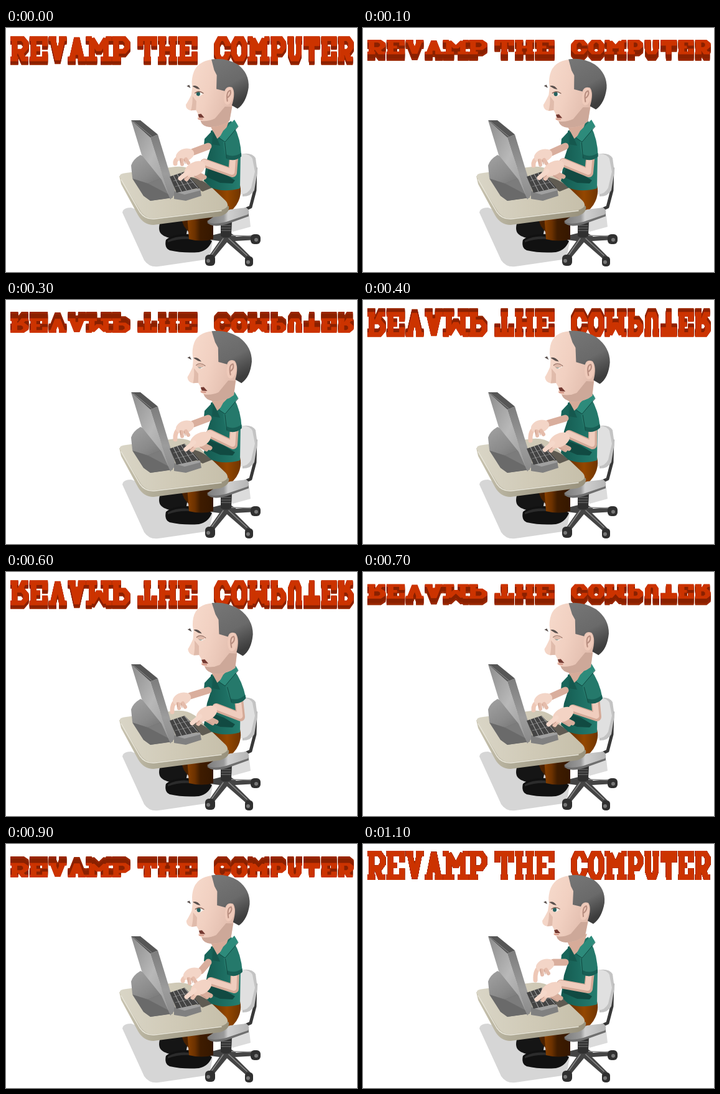
An HTML page that plays this animation: 564 by 394 pixels, repeating every 1200 ms.

```html
<!DOCTYPE html>
<html lang="en">
<head>
<meta charset="utf-8">
<title>Revamp the computer</title>
<style>
  html, body { margin: 0; width: 100%; height: 100%; overflow: hidden; background: #fff; }
  svg { display: block; width: 564px; height: 394px; }
  .line { fill: none; stroke-linecap: round; stroke-linejoin: round; }
  #title path { fill: none; stroke-width: 9; stroke-miterlimit: 2; }
</style>
</head>
<body>
<svg viewBox="0 0 564 394" role="img" aria-label="REVAMP THE COMPUTER">
  <defs>
    <linearGradient id="panel" x2="1" y2="1"><stop stop-color="#8c8c8c"/><stop offset=".5" stop-color="#b8b8b8"/><stop offset="1" stop-color="#999"/></linearGradient>
    <linearGradient id="side" x2="0" y2="1"><stop stop-color="#7d7d7d"/><stop offset=".6" stop-color="#9c9c9c"/><stop offset="1" stop-color="#8a8a8a"/></linearGradient>
    <linearGradient id="bulge" x2=".6" y2="1"><stop stop-color="#a2a2a2"/><stop offset=".5" stop-color="#8a8a8a"/><stop offset="1" stop-color="#666"/></linearGradient>
    <linearGradient id="desk" x2="1"><stop stop-color="#d9d5c6"/><stop offset=".5" stop-color="#d0cab7"/><stop offset="1" stop-color="#c6bfaa"/></linearGradient>
    <linearGradient id="rim" x2="1"><stop stop-color="#c9c4b1"/><stop offset=".3" stop-color="#b2ad99"/><stop offset="1" stop-color="#98917c"/></linearGradient>
    <linearGradient id="seat" x2="1"><stop stop-color="#7c7c7c"/><stop offset=".4" stop-color="#9a9a9a"/><stop offset=".5" stop-color="#cfcfcf"/><stop offset="1" stop-color="#b5b5b5"/></linearGradient>
    <linearGradient id="leg" x2="1"><stop stop-color="#8a4100"/><stop offset=".3" stop-color="#6b3100"/><stop offset=".5" stop-color="#3f1c00"/><stop offset="1" stop-color="#351700"/></linearGradient>
    <linearGradient id="hip" x2="1"><stop stop-color="#5a2900"/><stop offset=".6" stop-color="#944700"/><stop offset="1" stop-color="#6f3400"/></linearGradient>
    <linearGradient id="face" x2="1" y2=".4"><stop stop-color="#f8ddcf"/><stop offset=".5" stop-color="#f1d0c1"/><stop offset="1" stop-color="#ddb7a8"/></linearGradient>
    <linearGradient id="hair" x2=".4" y2="1"><stop stop-color="#777"/><stop offset=".6" stop-color="#6a6a6a"/><stop offset="1" stop-color="#3d3d3d"/></linearGradient>
    <linearGradient id="shirt" x2="1"><stop stop-color="#14594f"/><stop offset=".5" stop-color="#1c6c60"/><stop offset="1" stop-color="#257e70"/></linearGradient>
  </defs>

  <g id="title"></g>

  <!-- floor shadows -->
  <path fill="#d6d6d6" d="M187 298Q188 290 201 290L260 312 332 345 327 373 245 385Q230 387 222 375Z"/>
  <path fill="#dcdcdc" d="M370 303L391 303 393 321 364 329 358 316Z"/>

  <!-- chair -->
  <path class="line" stroke="#383838" stroke-width="5" d="M401 226L400 262 393 289 382 294"/>
  <path fill="#c3c3c3" d="M377 204Q394 200 401 210L404 232 399 262Q394 272 380 272Z"/>
  <path fill="#e0e0e0" d="M374 204Q390 201 396 211L400 232 394 258Q388 270 374 268Z"/>
  <path fill="#444" d="M346 331H361L370 337 402 334V342L368 344 393 369 387 374 355 346 332 374 325 370 343 344 328 342 330 335Z"/>
  <path class="line" stroke="#8a8a8a" stroke-width="1.5" d="M349 340L330 367M358 340L387 367M362 335L396 336"/>
  <path fill="#303030" d="M345 312H363L362 336Q353 341 345 336Z"/>
  <path class="line" stroke="#777" d="M346 319H361M346 323H361M346 327H361"/>
  <g fill="#303030">
    <rect x="320" y="366" width="16" height="18" rx="6"/><rect x="384" y="369" width="13" height="16" rx="5"/><rect x="393" y="333" width="16" height="16" rx="6"/>
  </g>
  <g fill="#777"><circle cx="325" cy="376" r="3"/><circle cx="389" cy="378" r="3"/><circle cx="402" cy="342" r="3"/></g>

  <!-- legs -->
  <path fill="#151515" d="M247 316Q244 328 250 333 260 342 288 342L294 312Q266 310 247 316Z"/>
  <path fill="#4a2100" d="M280 305H300V338L286 320Z"/>
  <path fill="#111" d="M257 342Q254 355 263 359 285 364 310 362 325 359 331 344L318 335Q272 328 257 342Z"/>
  <path fill="#2c2c2c" d="M260 343Q275 335 293 337L296 341Q276 340 260 346Z"/>
  <path fill="url(#leg)" d="M291 302H333V341Q315 346 294 341Z"/>
  <path fill="url(#hip)" d="M322 252L376 254Q380 270 370 286L357 302 345 300Z"/>
  <path fill="#6f6f6f" d="M323 314L355 304 390 296 390 304 354 317Q330 323 323 314Z"/>
  <path fill="url(#seat)" d="M323 312Q334 303 360 293L386 290Q393 295 389 301L354 313Q330 319 323 312Z"/>

  <!-- desk -->
  <path fill="url(#rim)" d="M182 239L185 252 212 302Q221 318 237 318L344 304Q360 299 358 288L340 275Z"/>
  <path fill="url(#desk)" d="M183 241Q181 235 193 234L272 224Q290 222 304 232L353 279Q362 289 346 294L240 307Q226 309 217 297L187 248Z"/>
  <path class="line" stroke="#e9e6da" stroke-width="1.5" d="M185 245L215 297Q224 310 240 308L346 295"/>
  <path fill="#5f5b52" d="M286 240Q312 240 331 258L316 264 300 256Z"/>

  <!-- monitor -->
  <path fill="url(#bulge)" d="M201 222Q204 212 216 205L228 210 254 238 268 274 232 279 221 271 203 242Z"/>
  <path fill="#6a6a6a" d="M203 243L228 251 256 240 266 274 232 279 221 271Z"/>
  <path fill="#7c7c7c" d="M228 251L256 240 264 270Z"/>
  <path fill="url(#panel)" d="M201 149L232 177 264 276 250 245 218 205Z"/>
  <path fill="url(#side)" d="M232 177L244 172 273 267 264 277Z"/>
  <path fill="#565656" d="M201 149L216 149 244 172 232 177Z"/>
  <path class="line" stroke="#8f8f8f" d="M205 151L234 175"/>

  <!-- keyboard -->
  <path fill="#808080" d="M270 264L312 260 314 271 289 279 270 276Z"/>
  <path fill="#a0a0a0" d="M273 265L311 259 313 262 287 269Z"/>
  <path fill="#444" d="M263 240L287 232 311 258 274 266Z"/>
  <path class="line" stroke="#777" d="M269 247L294 240M272 256L301 249"/>
  <path class="line" stroke="#b4b4b4" d="M269 238L282 264M275 236L290 262M281 234L299 261M287 233L308 258"/>

  <!-- man -->
  <path fill="#19655a" d="M334 163L319 179 318 189 329 195 338 182Z"/>
  <path fill="url(#shirt)" d="M345 160L329 166 331 187 323 212 318 247 330 258Q350 266 376 259L377 200 370 170 362 150Z"/>
  <path fill="#114a42" d="M326 226L350 235 368 246 364 251 344 250 321 240Z"/>
  <path fill="#d6ab99" d="M327 155L360 145 352 168 338 180 333 168Z"/>
  <path fill="#15584e" d="M333 167L339 178 344 190 331 188Z"/>
  <path id="farArm" class="line" stroke="#d9ae9d" stroke-width="11"/>
  <g id="farHand">
    <path id="farFinger" class="line" stroke="#eec8b7" stroke-width="7"/>
    <ellipse cx="3" cy="-1" rx="15" ry="10" transform="rotate(-18)" fill="#f3d5c7"/>
    <path class="line" stroke="#e5bcab" stroke-width="6" d="M4 5L8 11M-3 6L-2 13"/>
    <path class="line" stroke="#c99d8b" d="M-5 4L-4 11M1 5L3 12"/>
  </g>
  <path id="nearArm" class="line" stroke="#d4a997" stroke-width="14"/>
  <path id="nearLight" class="line" stroke="#f0cdbe" stroke-width="9" transform="translate(-1 -1.5)"/>
  <g id="sleeve">
    <path fill="#25796b" d="M349 178L366 158Q377 180 377 207 366 216 353 211 347 194 349 178Z"/>
    <path fill="#185f55" d="M353 204Q365 210 377 202V208Q366 217 353 211Z"/>
    <path class="line" stroke="#114a42" d="M351 185L353 210"/>
  </g>
  <path fill="#2d8b7b" d="M343 177L349 166 367 148 373 158 352 184Z"/>
  <path class="line" stroke="#114a42" d="M343 178L352 184 373 159"/>
  <g id="nearHand">
    <path class="line" stroke="#d8ae9c" stroke-width="7" d="M8 5L20 11M4 7L14 13"/>
    <path class="line" stroke="#e9c2b1" stroke-width="7" d="M-2 4L-9 14"/>
    <ellipse cx="5" rx="18" ry="11" transform="rotate(-28)" fill="#f3d3c4"/>
    <path class="line" stroke="#f5d8ca" stroke-width="7" d="M-6 2L-19 13"/>
    <path class="line" stroke="#c4978a" d="M-7 9L-13 15M4 9L12 14"/>
  </g>
  <g id="head">
    <path fill="url(#face)" d="M332 51Q306 54 300 76 297 88 299 95L297 108Q292 118 288 124 288 132 296 133L304 132 308 140 306 146 311 149Q313 158 326 159 345 158 357 148L362 124 380 90 365 60Q350 50 332 51Z"/>
    <path fill="#cda899" d="M311 149Q322 151 334 145L350 126 361 126 357 148Q345 158 326 159 313 158 311 149Z"/>
    <path fill="#e0bbab" d="M299 110L305 118 304 132 296 133Q299 123 299 110Z"/>
    <path fill="url(#hair)" d="M330 51Q352 47 371 58 390 72 388 95 384 119 370 129L361 124Q368 103 362 95 353 92 350 101L337 98 338 76 334 68Z"/>
    <ellipse cx="356" cy="109" rx="7" ry="14" transform="rotate(12 356 109)" fill="#efcaba"/>
    <path class="line" stroke="#b88e80" stroke-width="2" d="M354 117Q352 102 359 100 361 106 355 111"/>
    <path fill="#5a504d" d="M290 94L294 92 296 97ZM299 94Q306 91 311 99L306 98Z"/>
    <path fill="#f8f5f0" d="M304 106Q309 101 316 106L310 110Z"/>
    <ellipse id="iris" cx="308" cy="106" rx="3" ry="3.5" fill="#25615f"/>
    <path class="line" stroke="#8b685d" stroke-width="1.5" d="M303 105Q309 100 316 105"/>
    <path id="lid" fill="#dfb9a9" d="M303 105Q309 100 316 105L312 108 305 108Z"/>
    <path fill="#743a32" d="M307 139L312 138 317 144 309 144Z"/>
    <path class="line" stroke="#d49484" stroke-width="2" d="M308 146L314 146"/>
  </g>
</svg>

<script>
const $ = id => document.getElementById(id);
const set = (id, name, value) => $(id).setAttribute(name, value);

// Block lettering: strokes on an 8 by 8 grid, serifs reach past the sides.
const FEET = 'M-1.5 8H3.2M4.8 8H9.5', CAPS = 'M-1.5 0H3.2M4.8 0H9.5';
const BOWL = 'M1 0V8M-1.5 0H6L8 1.5V3.5L6 5H1';
const GLYPHS = {
  A: 'M1 8L4 -.4L7 8M2 5.5H6' + FEET,
  C: 'M8 3V2L6 0H2L0 2V6L2 8H6L8 6V5',
  E: 'M1 0V8M-1.5 0H8V3M-1.5 8H8V5M1 4H5',
  H: 'M1 0V8M7 0V8M1 4H7' + FEET + CAPS,
  M: 'M1 8V0L4 4.5L7 0V8M-1.5 0H1M7 0H9.5' + FEET,
  O: 'M2 0H6L8 2V6L6 8H2L0 6V2Z',
  P: BOWL + 'M-1.5 8H4',
  R: BOWL + 'M-1.5 8H3.3M4 4.5L6.5 8H9.5',
  T: 'M0 3V0H8V3M4 0V8M2 8H6',
  U: 'M1 0V6L2.5 8H5.5L7 6V0' + CAPS,
  V: 'M1 0L4 8.4L7 0' + CAPS
};
const WORDS = [['REVAMP', 6, 200], ['THE', 211, 308], ['COMPUTER', 334, 559]];
const BARS = [[6, 73], [74, 200], [211, 308], [334, 466], [467, 559]];
const HALF = 6;

function place(glyph, x, w) {
  const px = v => (x + 5 + v * (w - 10) / 8).toFixed(1);
  const py = v => (v * 4.75 - 19).toFixed(1);
  return glyph.replace(/([MLHV])([-.\d]+)(?: ([-.\d]+))?/g, (_, c, a, b) =>
    c === 'H' ? 'H' + px(a) : c === 'V' ? 'V' + py(a) : c + px(a) + ' ' + py(b));
}

function lettering() {
  let d = '';
  for (const [word, from, to] of WORDS) {
    const weight = c => c === 'M' ? 1.3 : 1;
    const unit = (to - from) / [...word].reduce((sum, c) => sum + weight(c), 0);
    let x = from;
    for (const c of word) {
      d += place(GLYPHS[c], x, unit * weight(c));
      x += unit * weight(c);
    }
  }
  return d;
}
const LETTERS = lettering();

function edgeOn(y, seed) {
  let out = '';
  for (const [from, to] of BARS) {
    for (let x = from; x < to;) {
      const r = Math.abs(Math.sin(x * 12.9 + seed) * 43758.5) % 1;
      const w = Math.min(5 + Math.floor(r * 11), to - x);
      const tint = ['#8a2100', '#8a2100', '#982600', '#a82a00'][Math.floor(r * 40) % 4];
      out += `<rect x="${x}" y="${y - HALF}" width="${w}" height="12" fill="${tint}"/>`;
      x += w;
    }
  }
  return out;
}

const MIDDLE = [36.5, 36, 35, 36, 36.5, 36, 36.5, 36.5, 37, 37, 36, 34.5];

// The word block turns 30 degrees per step about its long axis.
function titleAt(step) {
  const y = MIDDLE[step];
  if (step % 6 === 2) return edgeOn(y, step);
  const angle = (step + 1) * Math.PI / 6;
  const cos = Math.cos(angle), sin = Math.sin(angle), near = Math.sign(cos) * HALF;
  const layer = (z, color) =>
    `<path d="${LETTERS}" stroke="${color}" transform="translate(0 ${(y - z * sin).toFixed(2)}) scale(1 ${cos.toFixed(4)})"/>`;
  let out = '';
  for (let i = 0; i < 12; i++) out += layer(near * (i / 6 - 1), i < 4 ? '#9a2700' : '#8a2100');
  return out + layer(near, '#cc3300');
}

// far hand x, y, finger reach; near hand x, y; near elbow x
const POSES = [
  [285, 207, 14, 299, 230, 368], [287, 208, 16, 302, 229, 367],
  [288, 209, 17, 303, 228, 366], [285, 207, 20, 308, 228, 369],
  [282, 206, 23, 311, 229, 373], [281, 207, 22, 315, 230, 377],
  [280, 207, 21, 318, 231, 381], [287, 208, 17, 317, 233, 380],
  [294, 208, 14, 313, 236, 376], [297, 212, 11, 309, 234, 371],
  [293, 205, 18, 303, 236, 368], [290, 198, 24, 298, 238, 366]
];

function pose(step) {
  const n = (step + 1) % 12;
  const lean = Math.min(1, Math.min(n, 12 - n) / 5);
  const [fx, fy, reach, nx, ny, elbow] = POSES[step];
  // The turn of the head widens the skull and lowers its back.
  set('head', 'transform', `translate(${290 + 5 * lean} ${130 + lean})
    matrix(${1 + .07 * lean} ${.07 * lean} ${.09 * lean} ${1 + .06 * lean} 0 0) translate(-290 -130)`);
  set('lid', 'opacity', lean > .5 ? 1 : 0);
  set('iris', 'opacity', lean > .7 ? .5 : 1);
  set('sleeve', 'transform', `rotate(${(366 - elbow) * .7} 360 160)`);
  set('farArm', 'd', `M325 191L${fx + 16} ${fy - 7}`);
  set('farHand', 'transform', `translate(${fx} ${fy})`);
  set('farFinger', 'd', `M-6 1Q-14 6 -13 ${reach - 2}`);
  const arm = `M${elbow - 1 - (elbow - 366) * .4} 206L${elbow - 4} 234 ${nx + 20} ${ny - 12}`;
  set('nearArm', 'd', arm);
  set('nearLight', 'd', arm);
  set('nearHand', 'transform', `translate(${nx} ${ny})`);
}

let shown = -1;
const start = performance.now();
function tick() {
  const step = Math.floor((performance.now() - start) / 100) % 12;
  if (step !== shown) {
    shown = step;
    $('title').innerHTML = titleAt(step);
    pose(step);
  }
  requestAnimationFrame(tick);
}
tick();
</script>
</body>
</html>
```
